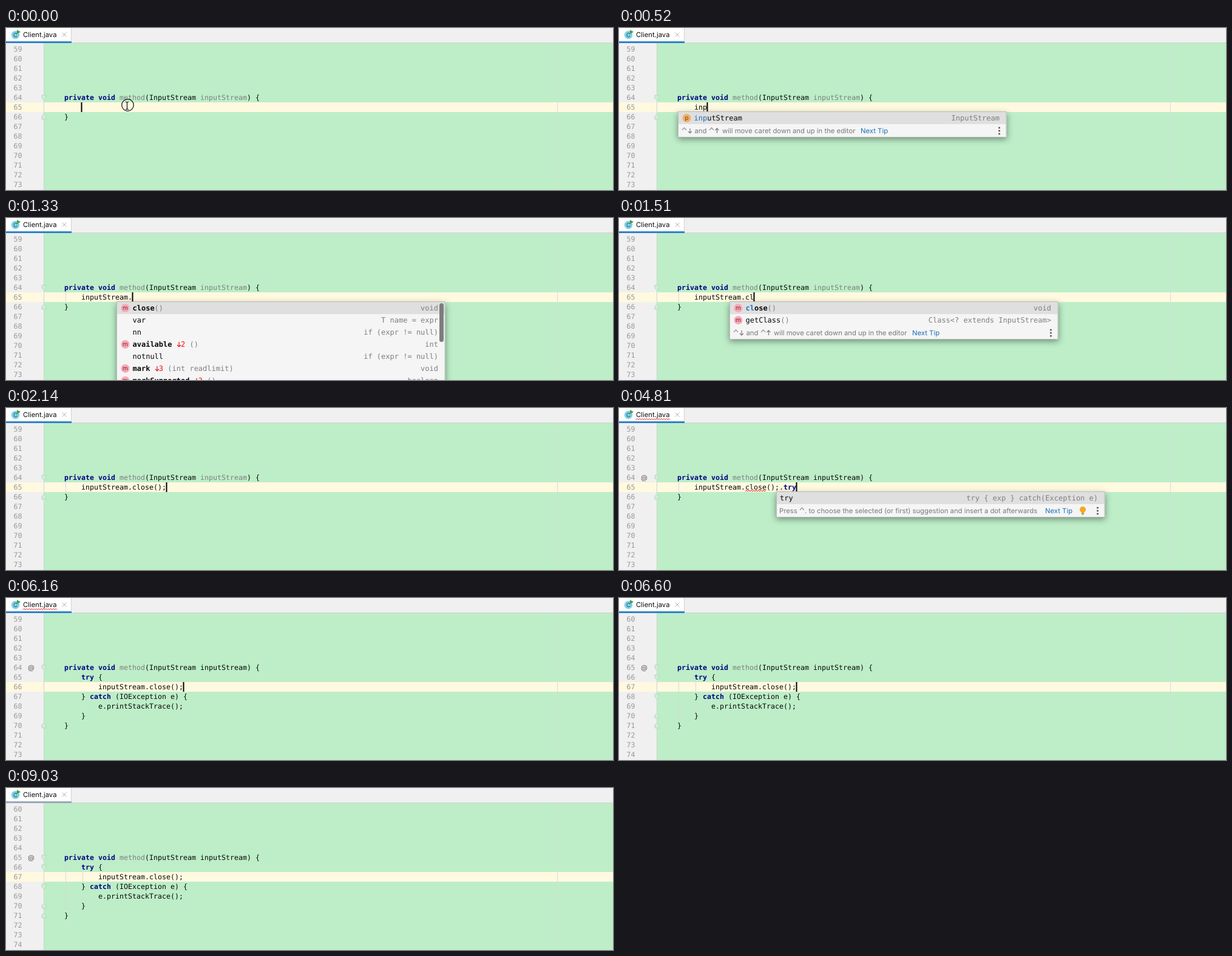
Animation of 1000x268 px, one loop 9.13 s. Source, as an HTML page with a canvas:

```html
<!DOCTYPE html>
<html lang="en">
<head>
<meta charset="utf-8">
<title>Editor: postfix completion</title>
<style>
  html, body { margin: 0; width: 100%; height: 100%; overflow: hidden; }
  canvas { display: block; width: 1000px; height: 268px; }
</style>
</head>
<body>
<canvas id="stage"></canvas>
<script>
const W = 1000, H = 268, LOOP = 9130;
const LINE = 16, CHAR = 7, ROW = 20, POPUP_W = 541.5;
const MONO = '"DejaVu Sans Mono", monospace';
const UI = '11.3px Inter, sans-serif';
const CODE = '11.63px ' + MONO, LIST = '12px ' + MONO;
const NAVY = '#000080', GRAY = '#7f7f7f', BLACK = '#080808', RED = '#f01010', LINK = '#1a6fbd';

const canvas = document.getElementById('stage');
const ctx = canvas.getContext('2d');
const dpr = window.devicePixelRatio || 1;
canvas.width = W * dpr;
canvas.height = H * dpr;
ctx.scale(dpr, dpr);

// Text on the edited line, each entry valid from its time on
const typing = [
  [0, ''], [80, 'i'], [170, 'in'], [350, 'inp'], [970, 'inputStream'],
  [1240, 'inputStream.'], [1420, 'inputStream.c'], [1510, 'inputStream.cl'],
  [1690, 'inputStream.clo'], [2140, 'inputStream.close();'],
  [2850, 'inputStream.close();.'], [3390, 'inputStream.close();.t'],
  [3480, 'inputStream.close();.tr'], [3560, 'inputStream.close();.try']
];
const caretOff = [[4360, 4810], [5350, 5890], [7320, 7860], [8310, 8850], [9030, LOOP]];
const pointer = [[0, 80, 200, 127], [7590, 7680, 208, 131], [7680, 7770, 290, 184], [7770, 7860, 405, 256]];

const icons = {
  p: ['#f4af63', '#6d4415'],
  m: ['#f9a9b7', '#75293a'],
  c: ['#7fd0e6', '#24505f']
};
const item = (icon, name, right, more = {}) => ({ icon, name, right, ...more });
const param = item('p', 'inputStream', 'InputStream');
const close = item('m', 'close', 'void', { bold: true, args: '()' });
const words = [
  param, item('', 'int', '', { bold: true }), item('', 'interface', '', { bold: true }),
  item('c', 'InputStream', 'java.io'), item('c', 'Integer', 'java.lang'),
  item('c', 'Instant', 'java.time'), item('c', 'IntStream', 'java.util.stream')
];
const members = [
  close,
  item('', 'var', 'T name = expr'),
  item('', 'nn', 'if (expr != null)'),
  item('m', 'available', 'int', { bold: true, count: 2, args: '()' }),
  item('', 'notnull', 'if (expr != null)'),
  item('m', 'mark', 'void', { bold: true, count: 3, args: '(int readlimit)' }),
  item('m', 'markSupported', 'boolean', { bold: true, count: 3, args: '()' })
];
const getClass = item('m', 'getClass', 'Class<? extends InputStream>', { args: '()' });
const wrap = item('', 'try', 'try { exp } catch(Exception e)', { flush: true });

const popups = [
  [260, 520, 97, words, ''],
  [520, 970, 97, [param], 'move'],
  [1330, 1510, 182, members, ''],
  [1510, 1780, 182, [close, getClass], 'move'],
  [1780, 2140, 182, [close], 'move'],
  [2940, 3390, 259, [wrap], 'move'],
  [3390, 6160, 259, [wrap], 'press']
];

const within = t => ([from, to]) => t >= from && t < to;

function rect(x, y, w, h, color) {
  ctx.fillStyle = color;
  ctx.fillRect(x, y, w, h);
}

function disc(x, y, r, color) {
  ctx.fillStyle = color;
  ctx.beginPath();
  ctx.arc(x, y, r, 0, 7);
  ctx.fill();
}

function poly(points, color, width = 1) {
  ctx.strokeStyle = color;
  ctx.lineWidth = width;
  ctx.beginPath();
  points.forEach(([x, y]) => ctx.lineTo(x, y));
  ctx.stroke();
}

function text(s, x, y, font, color, align = 'left') {
  ctx.font = font;
  ctx.fillStyle = color;
  ctx.textAlign = align;
  ctx.fillText(s, x, y);
}

// Runs of [string, color, bold] on the character grid
function code(x, top, ...runs) {
  for (const [s, color = BLACK, bold] of runs) {
    text(s, x, top + 12, (bold ? 'bold ' : '') + CODE, color);
    x += s.length * CHAR;
  }
}

function squiggle(x, y, w) {
  const points = [];
  for (let i = 0; i <= w; i += 2) points.push([x + i, y + (i % 4 ? 0 : 2)]);
  poly(points, RED);
}

function arrow(x, y, dir, color) {
  poly([[x, y - 4 * dir], [x, y + 4 * dir]], color, 1.2);
  poly([[x - 3, y + dir], [x, y + 4 * dir], [x + 3, y + dir]], color, 1.2);
}

function chevron(x, y) {
  poly([[x, y], [x + 3.5, y - 4], [x + 7, y]], '#787878', 1.1);
}

function badge(letter, x, y, r, size) {
  const [fill, ink] = icons[letter];
  disc(x, y, r, fill);
  text(letter === 'c' ? 'C' : letter, x, y + size * 0.34, size + 'px Inter, sans-serif', ink, 'center');
}

function drawTab(t) {
  rect(0, 0, W, 25, '#f0f0f0');
  rect(0, 0, 107, 24, '#ffffff');
  rect(107, 0, 1, 24, '#d0d0d0');
  rect(0, 24, W, 1, '#d0d0d0');
  rect(0, 22, 108, 3, t < 9030 ? '#2f82c9' : '#9ba7b9');
  badge('c', 15.5, 11.5, 6.7, 9.5);
  ctx.fillStyle = '#43a047';
  ctx.beginPath();
  ctx.moveTo(18, 3);
  ctx.lineTo(24, 6.5);
  ctx.lineTo(18, 10);
  ctx.fill();
  text('Client.java', 28, 15, UI, '#111');
  poly([[92.5, 7.5], [99.5, 14.5]], '#b4b4b4');
  poly([[99.5, 7.5], [92.5, 14.5]], '#b4b4b4');
  if (t >= 2590 && t < 6430) squiggle(28, 17.5, 56);
}

function drawFold(top, dir) {
  const y = top + 8;
  ctx.fillStyle = '#cdeed4';
  ctx.strokeStyle = '#b2dbba';
  ctx.lineWidth = 1;
  ctx.beginPath();
  [[-3.5, -4], [3.5, -4], [3.5, 1], [0, 4.5], [-3.5, 1]]
    .forEach(([dx, dy]) => ctx.lineTo(62.5 + dx, y + dy * dir));
  ctx.closePath();
  ctx.fill();
  ctx.stroke();
}

function drawPage(t) {
  const done = t >= 6160;
  const first = t < 6250 ? 59 : 60;
  const current = done ? 139 : 123;
  rect(0, 25, W, H, '#bdeec8');
  rect(0, 25, 62, H, '#f0f0f0');
  rect(0, current, W, LINE, '#fff9e0');
  rect(62, 25, 1, H, '#cfd4cf');
  rect(908, 25, 1, H, '#d5dfd6');
  for (let i = 0; i < 15; i++) text(first + i, 12.5, 39 + i * LINE, CODE, '#999');
  if (t >= 2500) text('@', 36, 118.5, UI, '#5a5a5a');

  drawFold(107, 1);
  if (!done) drawFold(139, -1);
  else {
    drawFold(203, -1);
    if (t >= 6600) {
      drawFold(123, 1);
      drawFold(155, 1);
      drawFold(187, -1);
    }
  }
}

function drawGuides(t) {
  const color = '#d4dcd4';
  if (t >= 1240 && t < 6160) rect(98, 123, 1, LINE, color);
  if (t >= 6520) {
    rect(98, 123, 1, 80, color);
    rect(126, 139, 1, LINE, color);
    rect(126, 171, 1, LINE, color);
  }
}

function drawCode(t, line) {
  code(96, 107, ['private void ', NAVY, true], ['method', GRAY], ['(InputStream '],
    ['inputStream', t < 2500 ? GRAY : BLACK], [') {']);
  if (t < 6160) {
    const keyword = line.endsWith('.try');
    code(124, 123, [keyword ? line.slice(0, -3) : line], [keyword ? 'try' : '', NAVY, true]);
    code(96, 139, ['}']);
    if (t >= 2500) squiggle(208, 136, 35);
    return;
  }
  code(124, 123, ['try', NAVY, true], [' {']);
  code(152, 139, ['inputStream.close();']);
  code(124, 155, ['} '], ['catch', NAVY, true], [' (IOException e) {']);
  code(152, 171, ['e.printStackTrace();']);
  code(124, 187, ['}']);
  code(96, 203, ['}']);
}

function drawCaret(t, line) {
  if (caretOff.some(within(t))) return;
  if (t < 6160) rect(123.5 + line.length * CHAR, 123, 2, LINE, '#000');
  else rect(291.5, 139, 2, LINE, '#000');
}

function drawItem(it, x, y, prefix) {
  const step = 7.224, base = y + 14;
  const font = (it.bold ? 'bold ' : '') + LIST;
  let tx = x + (it.flush ? 6 : 26.5);
  if (it.icon) badge(it.icon, x + 14.5, y + 10, 7, 10);
  const hit = !it.flush && it.name.startsWith(prefix) ? prefix.length : 0;
  text(it.name.slice(0, hit), tx, base, font, LINK);
  text(it.name.slice(hit), tx + hit * step, base, font, BLACK);
  tx += it.name.length * step;
  if (it.count) {
    arrow(tx + step * 1.6, y + 10, 1, RED);
    text(it.count, tx + step * 2, base, LIST, RED);
    tx += step * 4;
  }
  text(it.args || '', tx, base, LIST, GRAY);
  text(it.right, x + POPUP_W - 11.5, base, LIST, GRAY, 'right');
}

function drawTip(kind, x, y, bulb) {
  const base = y + 15, ink = '#787878', right = x + POPUP_W;
  if (kind === 'move') {
    chevron(x + 7, y + 10);
    arrow(x + 20, y + 11, 1, ink);
    text('and', x + 27.5, base, UI, ink);
    chevron(x + 52, y + 10);
    arrow(x + 64.5, y + 11, -1, ink);
    text('will move caret down and up in the editor', x + 73, base, UI, ink);
    text('Next Tip', x + 301, base, UI, LINK);
  } else {
    text('Press', x + 5, base, UI, ink);
    chevron(x + 39, y + 10);
    text('. to choose the selected (or first) suggestion and insert a dot afterwards', x + 47, base, UI, ink);
    text('Next Tip', x + 443, base, UI, LINK);
  }
  if (bulb) {
    disc(764, y + 9, 5, '#f5a81c');
    rect(762, y + 12, 4, 3, '#f5a81c');
    rect(761.5, y + 15, 5, 1, '#777');
    rect(762.5, y + 17, 3, 1, '#777');
  }
  for (const dy of [6, 11, 16]) disc(right - 12, y + dy, 1.6, '#5e5e5e');
}

function drawPopup(t, line) {
  const shown = popups.find(within(t));
  if (!shown) return;
  const [, , x, rows, tip] = shown;
  const y = 139, h = rows.length * ROW + (tip ? 22 : 0);
  ctx.save();
  ctx.shadowColor = 'rgba(0,0,0,.42)';
  ctx.shadowBlur = 10 * dpr;
  ctx.shadowOffsetY = 3 * dpr;
  rect(x, y, POPUP_W, h, '#f5f5f5');
  ctx.restore();
  rect(x, y, POPUP_W, ROW, '#dfdfdf');
  const prefix = line.split('.').pop();
  rows.forEach((it, i) => drawItem(it, x, y + i * ROW, prefix));
  if (tip) drawTip(tip, x, y + rows.length * ROW, t >= 4090);
  if (rows === members) {
    ctx.fillStyle = '#7d7d7d';
    ctx.beginPath();
    ctx.roundRect(714, 141, 7, 64, 3.5);
    ctx.fill();
  }
  ctx.strokeStyle = '#b9bdb9';
  ctx.lineWidth = 1;
  ctx.strokeRect(x + 0.5, y - 0.5, POPUP_W - 1, h);
}

function drawPointer(t) {
  const at = pointer.find(within(t));
  if (!at) return;
  const [, , x, y] = at;
  ctx.strokeStyle = '#111';
  ctx.lineWidth = 1.2;
  ctx.beginPath();
  ctx.arc(x + 0.5, y + 0.5, 9.8, 0, 7);
  ctx.stroke();
  const beam = (color, width) => {
    poly([[x - 3, y - 5], [x - 0.5, y - 4], [x + 2, y - 5]], color, width);
    poly([[x - 0.5, y - 4], [x - 0.5, y + 7]], color, width);
    poly([[x - 3, y + 8], [x - 0.5, y + 7], [x + 2, y + 8]], color, width);
  };
  beam('rgba(255,255,255,.7)', 2.6);
  beam('#111', 1.2);
}

function draw(t) {
  const line = typing.filter(([from]) => from <= t).pop()[1];
  ctx.textRendering = 'geometricPrecision';
  drawPage(t);
  drawTab(t);
  drawGuides(t);
  drawCode(t, line);
  drawCaret(t, line);
  drawPopup(t, line);
  drawPointer(t);
}

const start = performance.now();
function tick() {
  draw((performance.now() - start) % LOOP);
  requestAnimationFrame(tick);
}
tick();
</script>
</body>
</html>
```
